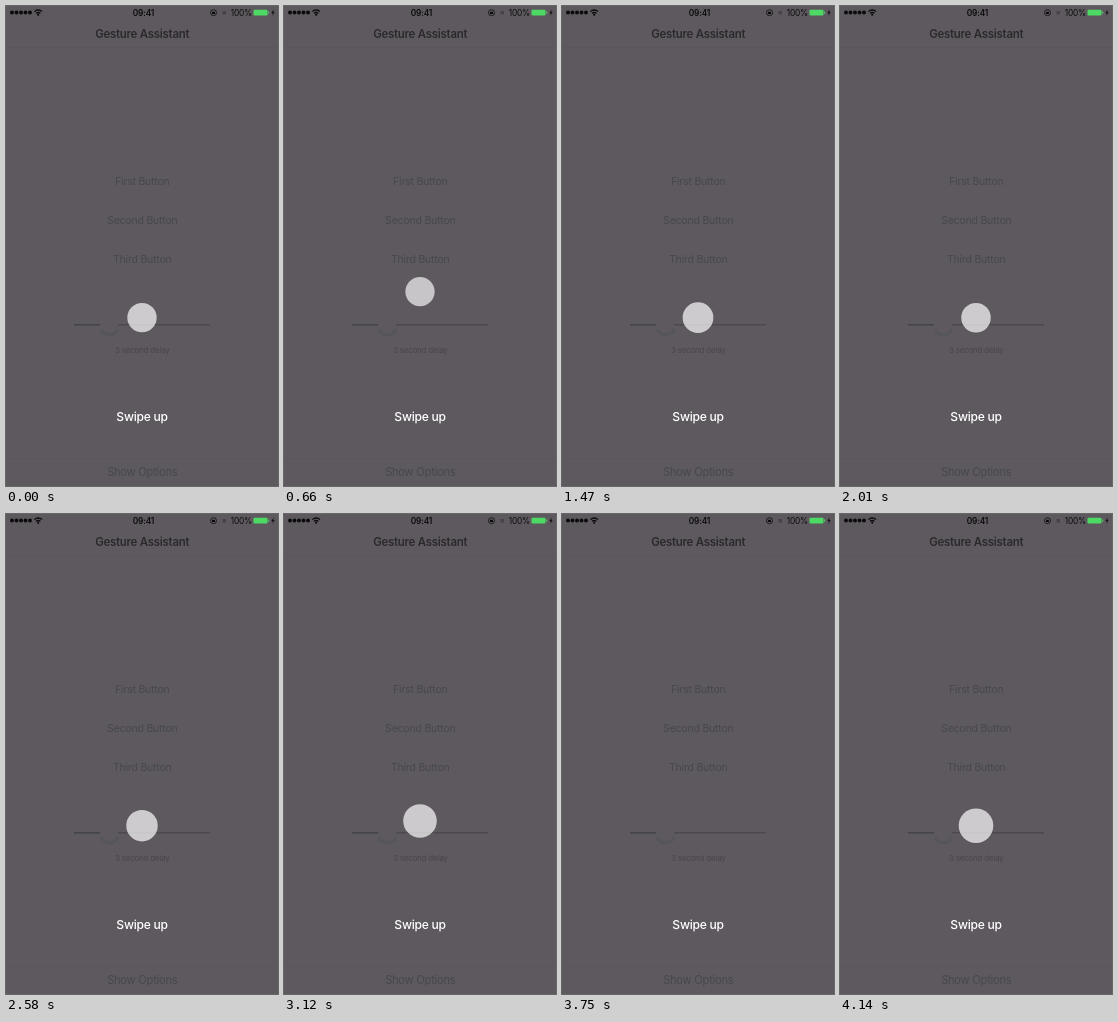
Animation of 272 by 480 pixels, one loop 4170 ms. Source, as an HTML page:

```html
<!DOCTYPE html>
<html lang="en">
<head>
<meta charset="utf-8">
<title>Gesture Assistant</title>
<style>
  html, body { margin: 0; width: 100%; height: 100%; overflow: hidden; background: #5e595f; }
  svg { display: block; width: 272px; height: 480px; }
  text { font-family: Inter, Roboto, sans-serif; letter-spacing: -.02em; text-anchor: middle; }
  .button { font-size: 10.5px; fill: #46484d; }
  .status { font-size: 8.3px; fill: #0c0b0c; }
  .bold { font-weight: 600; }
</style>
</head>
<body>
<svg viewBox="0 0 272 480">
  <rect width="272" height="480" fill="#5e595f"/>
  <path d="M0 41.5H272M0 452.5H272" stroke="#5a575b"/>

  <!-- status bar -->
  <path d="M6 6.5h18.1" stroke="#0c0b0c" stroke-width="4" stroke-linecap="round" stroke-dasharray="0 4.5"/>
  <g fill="none" stroke="#0c0b0c" stroke-width="1.3">
    <path d="M28.4 5.6a5.3 5.3 0 0 1 7.6 0M30 7.4a3.1 3.1 0 0 1 4.4 0"/>
    <circle cx="207.5" cy="6.7" r="3" stroke-width=".8"/>
  </g>
  <circle cx="32.2" cy="8.8" r="1"/>
  <rect x="206.2" y="5.8" width="2.6" height="2.2"/>
  <rect x="216.5" y="5" width="3.5" height="3.5" fill="#464347"/>
  <text class="status bold" x="137.4" y="9.7">09:41</text>
  <text class="status" x="235.4" y="9.7">100%</text>
  <rect x="247.5" y="3.8" width="14" height="5.6" rx="1" fill="#4cd964"/>
  <path d="M262.7 5.5v2.2" stroke="#4cd964"/>
  <path d="M267.6 3.4l-2.2 3.6h1.4l-.5 2.8 2.3-3.6h-1.4z" fill="#0c0b0c"/>

  <text class="bold" x="136.2" y="31.6" font-size="11.4" fill="#2b292c">Gesture Assistant</text>
  <text class="button" x="136.3" y="178.7">First Button</text>
  <text class="button" x="136.3" y="217.7">Second Button</text>
  <text class="button" x="136.3" y="256.7">Third Button</text>

  <!-- slider -->
  <path d="M68 318.8H94" stroke="#424449" stroke-width="1.5"/>
  <path d="M112 318.8H204" stroke="#4b494d" stroke-width="1.4"/>
  <path d="M95 323.5a9.5 9.5 0 0 0 17 0" fill="none" stroke="#54565b" stroke-width="3"/>
  <text x="136.3" y="346.7" font-size="7.9" fill="#48464a">3 second delay</text>

  <text x="136.1" y="414.6" font-size="12.1" font-weight="500" fill="#fff">Swipe up</text>
  <text class="button" x="136.3" y="469.8" style="font-size:11.1px">Show Options</text>
  <circle id="touch" cx="136" fill="#fff"/>
</svg>
<script>
const LOOP = 4170, PULSE = 700, SWIPE_AT = 1757, SWIPE_MS = 540;
// start of each gesture and the offset of its first pulse peak
const gestures = [[-1220, 135], [1310, 400], [3830, 400]];
const touch = document.getElementById('touch');
const clamp = x => Math.min(1, Math.max(0, x));

// cubic-bezier(.42, 0, .58, 1)
function easeInOut(x) {
  let lo = 0, hi = 1;
  for (let i = 0; i < 20; i++) {
    const s = (lo + hi) / 2;
    const bx = 1.26 * s * (1 - s) ** 2 + 1.74 * s * s * (1 - s) + s ** 3;
    if (bx < x) lo = s; else hi = s;
  }
  return lo * lo * (3 - 2 * lo);
}

function draw(t) {
  const [start, peak] = gestures.filter(g => g[0] <= t).pop();
  const u = t - start;
  const swipe = easeInOut(clamp((u - SWIPE_AT) / SWIPE_MS));
  const swing = u < peak + PULSE / 2 ? 3.2 : 2.2;
  const pulse = (1 + Math.cos((u - peak) / PULSE * 2 * Math.PI)) / 2;
  const fade = clamp(u / 120) * clamp((2430 - u) / 80);
  touch.setAttribute('r', 14.6 + swing * pulse);
  touch.setAttribute('cy', 311.7 - 240 * swipe);
  touch.setAttribute('opacity', (.69 - .34 * swipe) * fade);
}

const begin = performance.now();
function tick() {
  draw((performance.now() - begin) % LOOP);
  requestAnimationFrame(tick);
}
tick();
</script>
</body>
</html>
```
